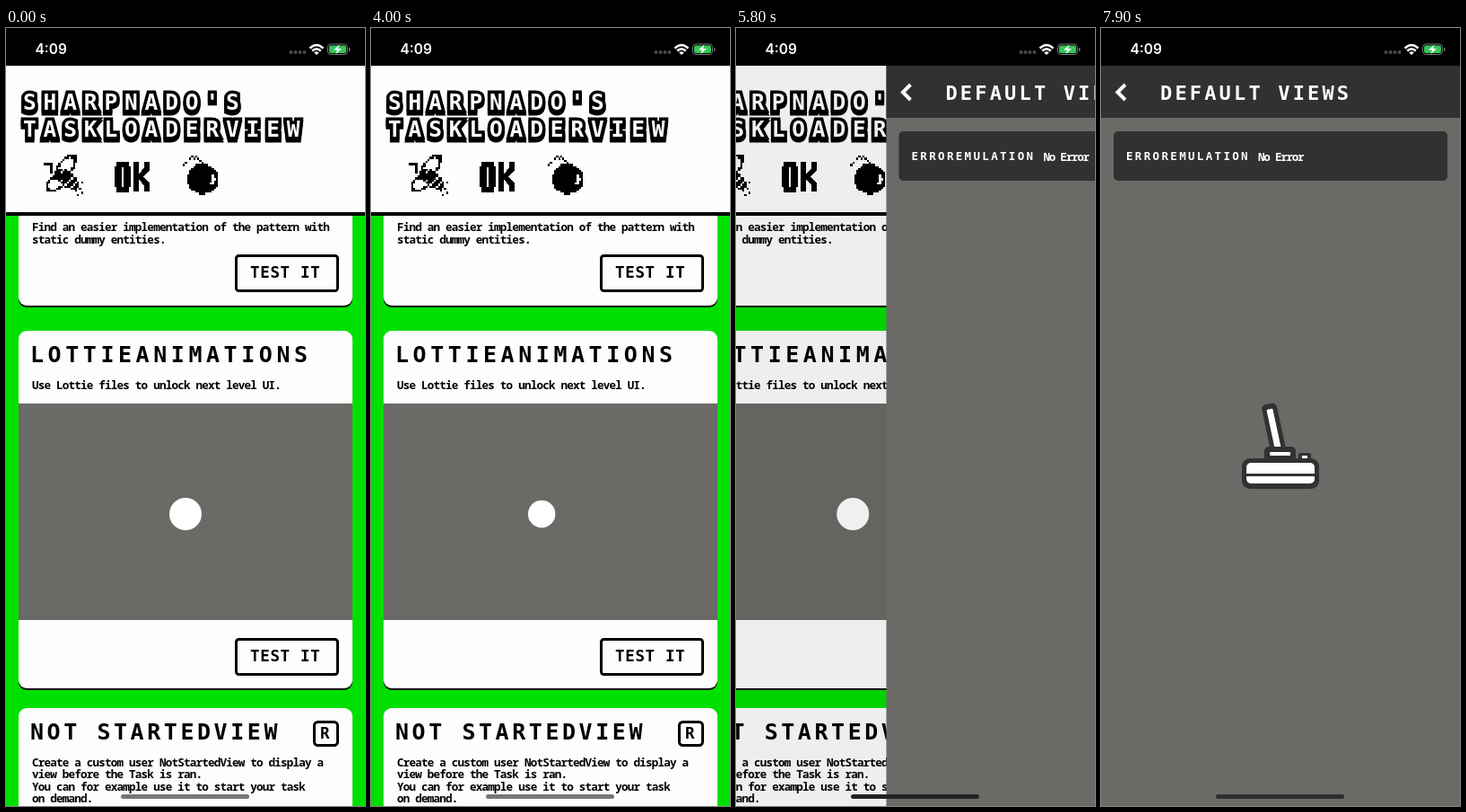
These frames come from a looping animation (400 px wide and 866 px high, 8000 ms). An HTML page:

```html
<!DOCTYPE html>
<html lang="en">
<head>
<meta charset="utf-8">
<title>Task loader demo</title>
<style>
  html, body { margin: 0; width: 100%; height: 100%; overflow: hidden; background: #000; }
  svg { display: block; width: 100vw; height: 100vh; }
  .mono { font-family: "Noto Sans Mono", "DejaVu Sans Mono", monospace; font-weight: 600; }
  .title { font-family: "DejaVu Sans Mono", monospace; font-weight: 700; }
  .clock { font: 600 15.5px Inter, sans-serif; }
  .light { fill: #fefefe; }
  .outline { fill: #fff; stroke: #000; stroke-width: 7; paint-order: stroke; }
  .shade { stroke: #000; stroke-width: 7; }
  .frame { fill: none; stroke: #000; stroke-width: 3; }
</style>
</head>
<body>
<svg id="stage" viewBox="0 0 400 866" preserveAspectRatio="none"></svg>
<script>
const LOOP = 8000, STEP = 100;
const PUSH_START = 5693, PUSH_RATE = 18.26;
const WHITE = '#fefdfe', GREEN = '#00e000', GREY = '#6b6a66', DARK = '#323033';

const rect = (x, y, w, h, fill, r = 0) =>
  `<rect x="${x}" y="${y}" width="${w}" height="${h}" rx="${r}" fill="${fill}"/>`;

// Monospaced line with a fixed distance between letters.
const line = (kind, x, y, size, advance, str) => {
  const em = kind.startsWith('mono') ? 0.6 : 0.602;
  return `<text class="${kind}" x="${x}" y="${y}" font-size="${size}" ` +
    `letter-spacing="${(advance - em * size).toFixed(2)}">${str}</text>`;
};
const body = (y, str) => line('mono', 29, y, 12.6, 6.76, str);

const card = (y, h) => rect(14, y + 2, 372, h, '#000', 9) + rect(14, y, 372, h, WHITE, 9);
const button = y =>
  `<rect class="frame" x="256.5" y="${y + 1.5}" width="113" height="39" rx="3"/>` +
  line('title', 272, y + 26, 17.5, 11.2, 'TEST IT');

// Pixel icon: every grid cell that passes the test becomes a square.
function pixels(x, y, count, size, test) {
  let d = '';
  for (let v = 0; v < count; v++)
    for (let u = 0; u < count; u++)
      if (test(u, v)) d += `M${(x + u * size).toFixed(1)} ${(y + v * size).toFixed(1)}h${size}v${size}h-${size}z`;
  return `<path d="${d}" shape-rendering="crispEdges"/>`;
}
function oval(u, v, cx, cy, a, b, angle) {
  const c = Math.cos(angle), s = Math.sin(angle), x = u - cx, y = v - cy;
  return Math.hypot((x * c + y * s) / a, (y * c - x * s) / b);
}
const ring = (...args) => Math.abs(oval(...args) - 1) < 0.17;

const bee = pixels(40, 141, 20, 2.3, (u, v) =>
  ring(u, v, 11, 5.5, 6.5, 3.2, -0.95) ||
  ring(u, v, 6.5, 13, 5.5, 3, -0.7) ||
  (oval(u, v, 12, 11.5, 6.5, 3.6, 0.75) < 1 && (u + v) % 4 !== 1) ||
  (v === 4 && u > 0 && u < 5) || (u === 4 && v > 4 && v < 9) ||
  (u > 14 && v > 12 && (u + 2 * v) % 5 === 0));

const bomb = pixels(197, 142, 19, 2.3, (u, v) =>
  (oval(u, v, 9.2, 10.9, 7.6, 7.2, 0) < 1 &&
    !(ring(u, v, 9.2, 10.9, 5, 5, 0) && u > 11 && u + v > 22 && v < 14)) ||
  (u > 5 && u < 10 && v === 4) ||
  (ring(u, v, 4.5, 4, 4.2, 3.6, 0) && v < 5 && (u + v) % 2 === 0));

const okIcon = `<g fill="none" stroke="#000" stroke-width="6" shape-rendering="crispEdges">
  <path d="M126 151.5H134V180H126Z M124 154V177 M136 154V177"/>
  <path d="M145 149V182 M157 149V157L149 165.5L157 174V182"/></g>`;

const heading = ['outline', 'shade', 'outline'].slice(1).map((style, i) => {
  const dy = i ? 0 : 3;
  return line('title ' + style, 19, 91 + dy, 24.5, 22.6, 'SHARPNADO\'S') +
    line('title ' + style, 19, 121 + dy, 24.5, 22.6, 'TASKLOADERVIEW');
}).join('');

const listPage = `<g id="list">
  ${rect(0, 42, 400, 824, GREEN)}
  ${card(180, 129)}
  ${body(226, 'Find an easier implementation of the pattern with')}
  ${body(240, 'static dummy entities.')}
  ${button(252)}
  ${card(337, 398)}
  ${line('title', 27, 372, 25, 19.6, 'LOTTIEANIMATIONS')}
  ${body(402, 'Use Lottie files to unlock next level UI.')}
  ${rect(14, 418, 372, 241, GREY)}
  <circle id="mark" fill="#fff"/>
  ${button(679)}
  ${card(757, 130)}
  ${line('title', 27, 792, 25, 18.6, 'NOT STARTEDVIEW')}
  <rect class="frame" x="343.5" y="772.5" width="26" height="26" rx="4"/>
  ${line('title', 350, 791, 17.5, 11, 'R')}
  ${body(822, 'Create a custom user NotStartedView to display a')}
  ${body(835, 'view before the Task is ran.')}
  ${body(849, 'You can for example use it to start your task')}
  ${body(862, 'on demand.')}
  ${rect(0, 42, 400, 163, WHITE)}${rect(0, 205, 400, 4, '#000')}
  ${heading}${bee}${okIcon}${bomb}
  </g>`;

const joystick = `<g id="joystick">
  <g id="stick">${rect(191.5, 417, 17, 62, DARK, 5)}${rect(196.5, 423, 7, 50, '#fff', 1)}</g>
  <g id="trigger">${rect(220, 473, 14, 10, DARK, 2)}${rect(224, 476, 6, 3, '#fff')}</g>
  ${rect(182, 466, 35, 17, DARK, 5)}${rect(188, 472, 23, 4, '#fff', 1)}
  ${rect(157, 479, 86, 34, DARK, 9)}${rect(162, 484, 76, 23, '#fff', 5)}
  ${rect(162, 496, 76, 3, DARK)}</g>`;

const detailPage = `<g id="detail">
  ${rect(0, 42, 400, 824, GREY)}${rect(0, 42, 400, 58, DARK)}
  <path d="M27 63L18.5 71.5L27 80" fill="none" stroke="#fff" stroke-width="4"/>
  ${line('title light', 66, 79.5, 22, 16.4, 'DEFAULT VIEWS')}
  ${rect(14, 115, 372, 55, DARK, 5)}
  ${line('title light', 28, 147, 12.5, 9.85, 'ERROREMULATION')}
  ${line('mono light', 175, 147.5, 12.6, 6.3, 'No Error')}
  ${joystick}</g>`;

const dots = [317.5, 322.5, 327.5, 332.5]
  .map(x => `<circle cx="${x}" cy="27" r="2" fill="#4a4a4a"/>`).join('');
const statusBar = `${rect(0, 0, 400, 42, '#000')}
  <text class="clock light" x="32.5" y="29">4:09</text>${dots}
  <g fill="none" stroke="#fff" stroke-width="2.5">
    <path d="M338.5 22.5Q346 15.5 353.5 22.5M341.3 25.5Q346 21 350.7 25.5"/></g>
  <path d="M343.2 27.3Q346 25 348.8 27.3L346 30Z" fill="#fff"/>
  <rect x="358.5" y="18" width="22" height="11.5" rx="3.5" fill="none" stroke="#777"/>
  ${rect(360, 19.5, 19, 8.5, '#34c759', 2)}${rect(382, 22, 1.5, 4, '#777', 0.7)}
  <path d="M371.5 18.5L365 24.5H369L367.5 29L374 23H370Z" fill="#fff"/>`;

document.getElementById('stage').innerHTML =
  listPage + '<rect id="dim" y="42" width="400" height="824"/>' + detailPage + statusBar +
  '<rect id="home" x="128" y="853" width="143" height="5" rx="2.5"/>';

const el = Object.fromEntries(
  [...document.querySelectorAll('#stage [id]')].map(node => [node.id, node]));
const set = (node, attrs) => Object.entries(attrs).forEach(([k, v]) => node.setAttribute(k, v));

// time, centre x, centre y, radius
const markSteps = [
  [0, 200, 541, 18], [1599, 200, 541, 18], [1600, 170, 507, 0], [2100, 170, 507, 4],
  [2600, 169, 541, 9], [3400, 182, 541, 13], [4300, 193, 541, 16],
  [5200, 200, 541, 18], [LOOP, 200, 541, 18]
];
function markAt(t) {
  const i = markSteps.findIndex(step => step[0] > t);
  const a = markSteps[i - 1], b = markSteps[i];
  const k = (t - a[0]) / (b[0] - a[0]), ease = k * k * (3 - 2 * k);
  return a.slice(1).map((value, n) => value + (b[n + 1] - value) * ease);
}

// Critically damped spring, from 0 to 1.
function pushAt(t) {
  const w = Math.max(0, t - PUSH_START) / 1000 * PUSH_RATE;
  return 1 - (1 + w) * Math.exp(-w);
}

function draw(t) {
  const [cx, cy, r] = markAt(t), push = pushAt(t);
  set(el.mark, { cx, cy, r });
  set(el.list, { transform: `translate(${-120 * push} 0)` });
  set(el.dim, { opacity: 0.1 * push });
  set(el.detail, { transform: `translate(${400 * (1 - push)} 0)` });
  set(el.home, { fill: t < PUSH_START ? '#777' : t < 6000 ? '#222' : '#302e31' });

  const angle = 12.2 * Math.sin((t - 6671) / 1600 * 2 * Math.PI);
  const pressed = t < 7000 || (t >= 7300 && t < 7600);
  set(el.joystick, { visibility: t < 6300 ? 'hidden' : 'visible' });
  set(el.stick, { transform: `rotate(${angle} 200 481)` });
  set(el.trigger, { transform: `translate(0 ${pressed ? 3 : 0})` });
}

const start = performance.now();
function tick() {
  const t = (performance.now() - start) % LOOP;
  draw(Math.floor(t / STEP) * STEP);
  requestAnimationFrame(tick);
}
tick();
</script>
</body>
</html>
```
